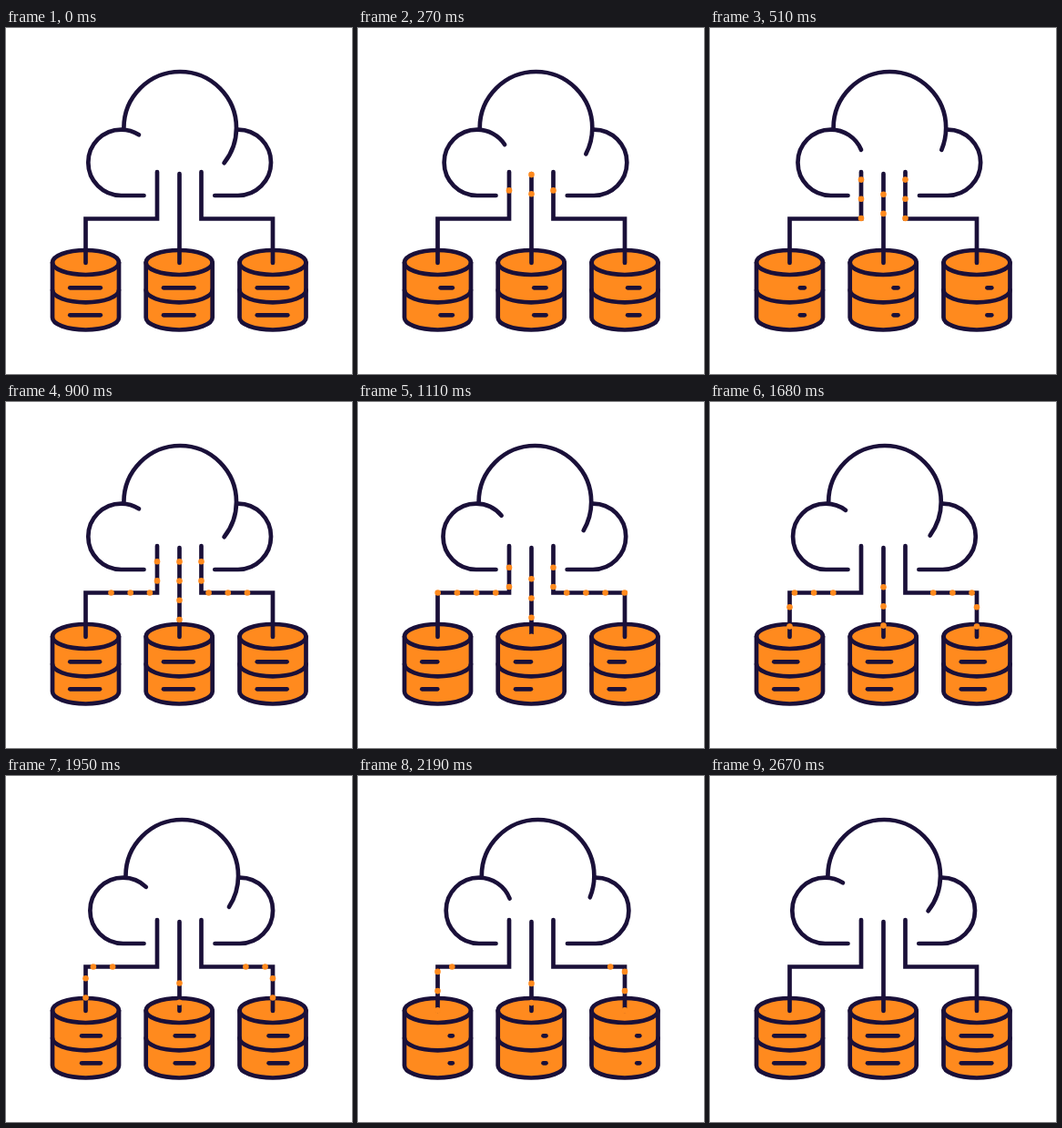
Write an HTML page with a canvas that moves like this. It is 380x380 px and loops after 3.87 s.

```html
<!DOCTYPE html>
<html lang="en">
<head>
<meta charset="utf-8">
<title>Cloud databases</title>
<style>
html, body { margin: 0; width: 100%; height: 100%; overflow: hidden; background: #fff; }
canvas { display: block; width: 100vmin; height: 100vmin; }
</style>
</head>
<body>
<canvas id="stage"></canvas>
<script>
const SIZE = 380, LOOP = 3870, ACTIVE = 2670, STEP = 30;
const BEAT = ACTIVE / 3;
const NAVY = '#1a1039', ORANGE = '#ff8a1e';
const GAP = 21.2;
const canvas = document.getElementById('stage');
const ctx = canvas.getContext('2d');
const scale = Math.max(1, window.devicePixelRatio || 1);
canvas.width = canvas.height = SIZE * scale;

const LEFT = [[166, 158], [166, 209.5], [87.5, 209.5], [87.5, 258]];
const MIDDLE = [[190.5, 160], [190.5, 258]];
const RIGHT = [[214.5, 158], [214.5, 209.5], [293, 209.5], [293, 258]];

// Distance travelled by the first dot and by the cut-off behind the last one.
const SIDE_HEAD = [[110, 0], [510, 51], [900, 102], [1350, 161.6], [1680, 209.4], [2190, 283.8], [2670, 354]];
const SIDE_TAIL = [[0, 0], [1300, 8], [1680, 72], [2190, 108], [2670, 180]];

const mix = (a, b, k) => a + (b - a) * k;
const rad = deg => deg * Math.PI / 180;

function track(keys, t) {
  if (t <= keys[0][0]) return keys[0][1];
  for (let i = 1; i < keys.length; i++) {
    const [t0, v0] = keys[i - 1], [t1, v1] = keys[i];
    if (t <= t1) return mix(v0, v1, (t - t0) / (t1 - t0));
  }
  return keys[keys.length - 1][1];
}

function stroke(build) {
  ctx.beginPath();
  build();
  ctx.stroke();
}

function polyline(points) {
  stroke(() => points.forEach(([x, y]) => ctx.lineTo(x, y)));
}

function pointAt(points, s) {
  for (let i = 1; i < points.length; i++) {
    const [x0, y0] = points[i - 1], [x1, y1] = points[i];
    const len = Math.hypot(x1 - x0, y1 - y0);
    if (s <= len) return [mix(x0, x1, s / len), mix(y0, y1, s / len)];
    s -= len;
  }
  return null;
}

function drawCloud(t) {
  const k = (1 - Math.cos(2 * Math.PI * t / BEAT)) / 2;
  const dx = 6.5 * k;
  stroke(() => ctx.arc(191.2 + dx, 109.8, 61.8, Math.PI, rad(mix(398.5, 382, k))));
  stroke(() => {
    ctx.moveTo(151.5, 184);
    ctx.arc(126.5 + dx, 147.8, 36.2, rad(90), rad(mix(302.5, 339, k)));
  });
  stroke(() => {
    ctx.arc(254.8 + dx, 147.8, 36.2, rad(-90), rad(90));
    ctx.lineTo(229.3 + 0.7 * k, 184);
  });
}

function drawDatabase(cx, t) {
  const rx = 36.5, ry = 13.5, top = 257.5, bottom = 318;
  ctx.beginPath();
  ctx.ellipse(cx, top, rx, ry, 0, Math.PI, 2 * Math.PI);
  ctx.ellipse(cx, bottom, rx, ry, 0, 0, Math.PI);
  ctx.closePath();
  ctx.fillStyle = ORANGE;
  ctx.fill();
  ctx.stroke();
  for (const y of [top, 287.8]) {
    stroke(() => ctx.ellipse(cx, y, rx, ry, 0, 0, Math.PI));
  }

  // The label bars shrink to the right, then left, then right.
  const open = Math.abs(2 * (t % BEAT) / BEAT - 1);
  const len = Math.max(3, 33.5 * open);
  const toLeft = Math.floor(t / BEAT) === 1;
  const x = toLeft ? cx - 17.2 : cx + 16.3 - len;
  for (const y of [285.3, 315.3]) polyline([[x, y], [x + len, y]]);
}

function drawDots(points, head, tail) {
  ctx.fillStyle = ORANGE;
  for (let s = head; s > 0 && s >= tail; s -= GAP) {
    const p = pointAt(points, s);
    if (!p) continue;
    ctx.beginPath();
    ctx.arc(p[0], p[1], 3.3, 0, 2 * Math.PI);
    ctx.fill();
  }
}

function draw(t) {
  ctx.setTransform(scale, 0, 0, scale, 0, 0);
  ctx.fillStyle = '#fff';
  ctx.fillRect(0, 0, SIZE, SIZE);
  ctx.strokeStyle = NAVY;
  ctx.lineWidth = 4.7;
  ctx.lineCap = 'round';
  ctx.lineJoin = 'miter';

  drawCloud(t);
  for (const cx of [87.5, 190.2, 293]) drawDatabase(cx, t);
  for (const line of [LEFT, MIDDLE, RIGHT]) polyline(line);

  const head = track(SIDE_HEAD, t), tail = track(SIDE_TAIL, t);
  drawDots(LEFT, head, tail);
  drawDots(RIGHT, head, tail);
  drawDots(MIDDLE, 0.09 * t - 2, 100 * (t / ACTIVE) ** 2 - 2);
}

const start = performance.now();
function tick() {
  const t = (performance.now() - start) % LOOP;
  draw(Math.min(Math.floor(t / STEP) * STEP, ACTIVE));
  requestAnimationFrame(tick);
}
tick();
</script>
</body>
</html>
```
